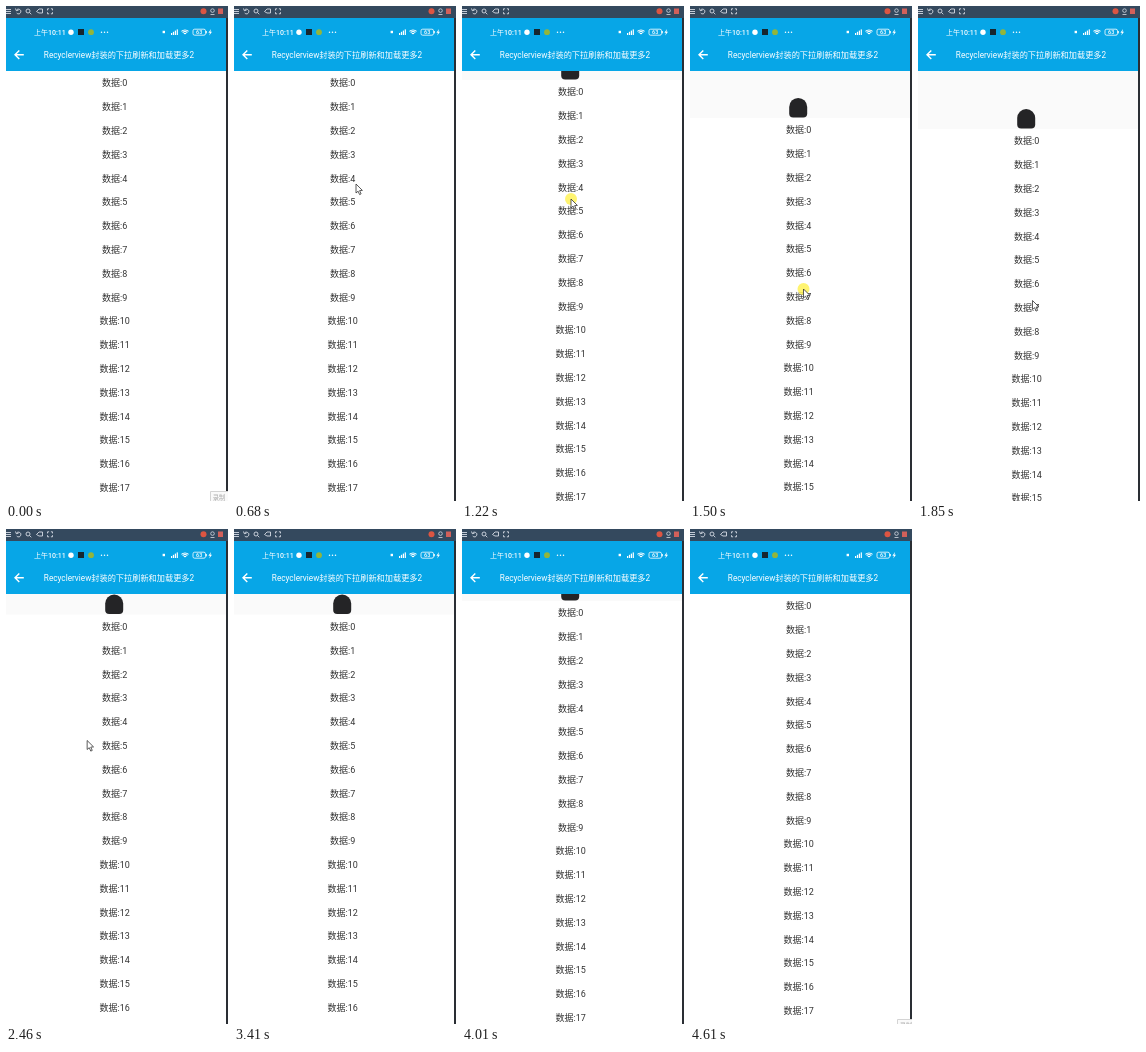
Write an HTML page with a canvas that moves like this. It is 222 px wide and 495 px high and loops after 4680 ms.

```html
<!DOCTYPE html>
<html lang="zh">
<head>
<meta charset="utf-8">
<title>Pull to refresh</title>
<style>
html, body { margin: 0; width: 100%; height: 100%; overflow: hidden; background: #fff; }
canvas { display: block; width: 222px; height: 495px; }
</style>
</head>
<body>
<canvas id="stage"></canvas>
<script>
const W = 222, H = 495, LOOP = 4680, STEPS = 69;
const BAR = 12, TOP = 65, RIGHT = 220, ROW = 23.8;
const MAX_PULL = 58, REFRESH = 20.5;
const FONT = "Roboto, 'Noto Sans CJK SC', 'Noto Sans CJK', sans-serif";
const ARROW = new Path2D('M0 0V9L2.1 7.2L3.6 10.6L5.1 9.9L3.6 6.6L6.4 6.4Z');
const BOLT = new Path2D('M205 23L202.4 26.8H204L203.2 29.6L206 25.7H204.4Z');
const canvas = document.getElementById('stage');
const ctx = canvas.getContext('2d');
const ratio = window.devicePixelRatio || 1;
canvas.width = W * ratio;
canvas.height = H * ratio;

// Turning points of the pointer: step, x, y.
const ROUTE = [[1, 214, 484], [8, 128, 205], [14, 110, 124], [18, 109, 193],
  [22, 113.5, 283], [27, 114.5, 294.5], [33, 82.3, 211], [39, 80, 212], [47, 222, 464]];

const progress = (step, from, to) => Math.min(1, Math.max(0, (step - from) / (to - from)));
const mix = (a, b, p) => a + (b - a) * p;
const ease = p => (1 - Math.cos(Math.PI * p)) / 2;

// Damped drag, settle to the refresh height, then close.
function pullAt(step) {
  if (step < 27) return MAX_PULL * Math.sin(Math.PI / 2 * progress(step, 17.2, 25.2));
  if (step < 56) return mix(MAX_PULL, REFRESH, ease(progress(step, 27, 32)));
  return REFRESH * (1 - ease(progress(step, 56, 61)));
}

function pointerAt(step) {
  const i = ROUTE.findIndex(key => step < key[0]);
  const [from, x0, y0] = ROUTE[i - 1], [to, x1, y1] = ROUTE[i];
  const p = progress(step, from, to);
  return [mix(x0, x1, p), mix(y0, y1, p)];
}

function rect(x, y, w, h, color) {
  ctx.fillStyle = color;
  ctx.fillRect(x, y, w, h);
}

function disc(x, y, r, color) {
  ctx.fillStyle = color;
  ctx.beginPath();
  ctx.arc(x, y, r, 0, Math.PI * 2);
  ctx.fill();
}

function stroke(path, color, width) {
  ctx.strokeStyle = color;
  ctx.lineWidth = width;
  ctx.stroke(new Path2D(path));
}

function arc(x, y, r, from, to, color, width) {
  ctx.strokeStyle = color;
  ctx.lineWidth = width;
  ctx.beginPath();
  ctx.arc(x, y, r, from, to);
  ctx.stroke();
}

function text(value, x, y, size, color, weight = 400, align = 'center') {
  ctx.font = `${weight} ${size}px ${FONT}`;
  ctx.textAlign = align;
  ctx.fillStyle = color;
  ctx.fillText(value, x, y);
}

function drawToolbar() {
  const c = '#d5dbe4';
  rect(0, 0, W, BAR, '#34495e');
  for (let y = 3; y < 8; y += 2) rect(0, y, 5, 0.9, c);
  arc(12.5, 5.5, 2.4, -2.6, 2.4, c, 0.9);
  arc(22, 5, 2, 0, 7, c, 0.9);
  stroke('M9.5 2.5L10.3 4.7L12.5 4.2M23.5 6.5L25.3 8.3', c, 0.9);
  stroke('M30.5 5.5L33 3H36.5V7H33Z', c, 0.9);
  stroke('M41.5 4.4V2.8H43.1M44.9 2.8H46.5V4.4M46.5 6.2V7.8H44.9M43.1 7.8H41.5V6.2', c, 0.9);
  disc(197.5, 5.2, 3, '#dc5542');
  arc(206.5, 4.6, 1.8, 0, 7, c, 0.8);
  stroke('M204.5 8.5H208.5', c, 0.8);
  rect(212, 2.5, 5, 5.5, '#d2605a');
}

function drawStatus() {
  const c = '#fff';
  text('上午10:11', 28, 29, 7, c, 500, 'left');
  disc(65, 26.3, 2.7, c);
  rect(72, 23, 6, 6, '#17262e');
  disc(85, 26.2, 2.9, '#93b53b');
  for (let i = 0; i < 3; i++) disc(95.5 + i * 3, 26.3, 0.75, c);
  rect(156.6, 24.8, 2.4, 2.4, c);
  for (let i = 0; i < 4; i++) rect(165 + i * 1.9, 27 - i * 1.2, 1.2, 2 + i * 1.2, c);
  for (let r = 1.6; r < 6; r += 1.7) arc(179, 29, r, -2.35, -0.79, c, 1.1);
  ctx.strokeStyle = c;
  ctx.lineWidth = 0.8;
  ctx.beginPath();
  ctx.roundRect(187, 23.2, 12.5, 6, 1.6);
  ctx.stroke();
  rect(200.2, 25, 0.8, 2.4, c);
  text('63', 193.2, 28.2, 5.5, c, 500);
  ctx.fill(BOLT);
}

function drawHeader() {
  rect(0, BAR, RIGHT, TOP - BAR, '#07a6e7');
  drawStatus();
  stroke('M17.8 48.8H9.2M13.3 44.5L9 48.8L13.3 53.1', '#fff', 1.4);
  text('Recyclerview封装的下拉刷新和加载更多2', 113, 52, 8.2, '#fff');
}

function drawList(pull) {
  rect(0, TOP, RIGHT, pull, '#fafafa');
  if (pull > 0) {
    ctx.fillStyle = '#242426';
    ctx.beginPath();
    ctx.roundRect(99.2, TOP + pull - 20, 18, 19.5, [9, 9, 4, 4]);
    ctx.fill();
  }
  for (let i = 0; i < 18; i++) {
    text('数据:' + i, 108.7, 80.4 + i * ROW + pull, 9, '#333');
  }
}

function drawPointer(x, y, pressed) {
  if (pressed) disc(x, y, 6, 'rgba(255,242,80,0.82)');
  ctx.save();
  ctx.translate(x, y);
  ctx.fillStyle = '#fff';
  ctx.fill(ARROW);
  ctx.strokeStyle = '#333';
  ctx.lineWidth = 0.8;
  ctx.stroke(ARROW);
  ctx.restore();
}

function drawPopup(x, y) {
  rect(x, y, W - x, H - y, '#fafafa');
  stroke(`M${x + 0.5} ${H}V${y + 0.5}H${W}`, '#d4d4d4', 1);
  text('录制', x + 9, y + 9, 6.3, '#a5a5a5');
}

function draw(step) {
  ctx.setTransform(ratio, 0, 0, ratio, 0, 0);
  rect(0, 0, W, H, '#fff');
  drawList(pullAt(step));
  drawHeader();
  rect(RIGHT, BAR, W - RIGHT, H - BAR, '#2a2e34');
  drawToolbar();
  if (step === 0) drawPopup(204, 485);
  if (step === STEPS - 1) drawPopup(207, 490);
  if (step >= 1 && step < 47) drawPointer(...pointerAt(step), step >= 17 && step <= 24);
}

const start = performance.now();
function tick() {
  const t = (performance.now() - start) % LOOP;
  draw(Math.min(STEPS - 1, Math.floor((t + 4) * STEPS / LOOP)));
  requestAnimationFrame(tick);
}
tick();
</script>
</body>
</html>
```
